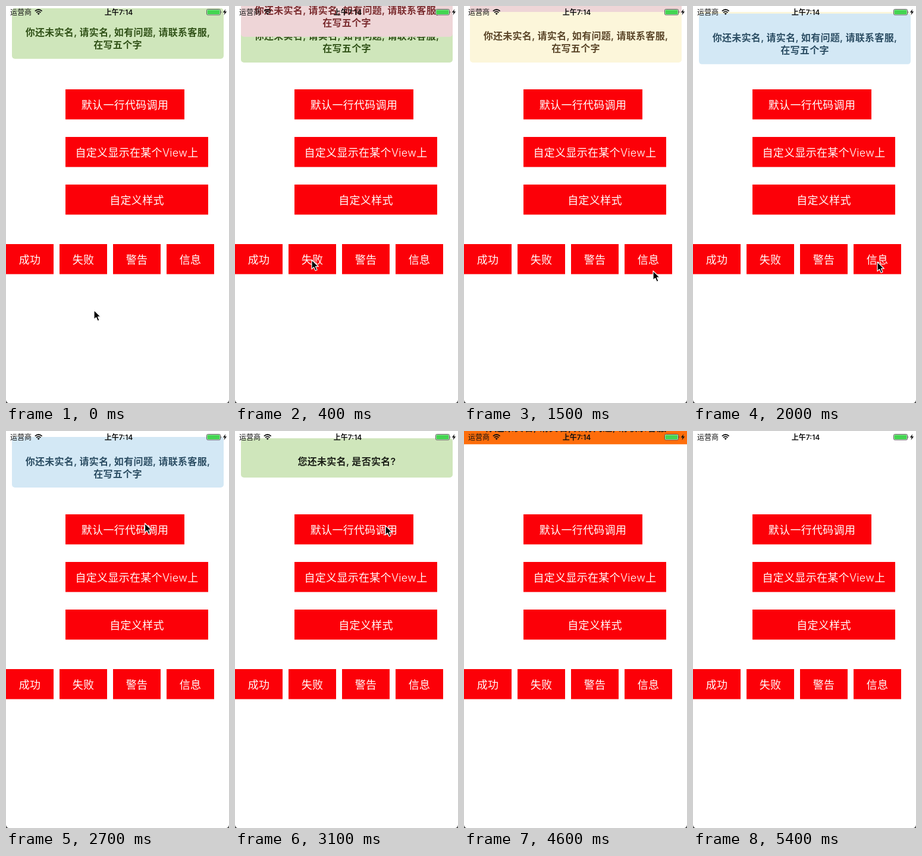
An HTML page that plays this animation: 375 px wide and 667 px high, repeating every 5500 ms.

```html
<!DOCTYPE html>
<html lang="zh-CN">
<head>
<meta charset="utf-8">
<title>Banner messages</title>
<style>
  html, body { margin: 0; width: 100%; height: 100%; overflow: hidden; background: #fff; }
  svg { display: block; width: 375px; height: 667px; }
  text { font-family: Inter, "Noto Sans CJK SC", "Noto Sans CJK", sans-serif; text-anchor: middle; }
  .label { font-size: 18px; font-weight: 300; letter-spacing: .3px; fill: #fff; }
  .message { font-size: 16px; font-weight: 600; letter-spacing: .3px; }
  .status { font-size: 12px; fill: #111; }
</style>
</head>
<body>
<svg id="stage" viewBox="0 0 375 667">
  <rect width="375" height="667" fill="#fff"/>
  <g id="buttons"></g>
  <g id="banners"></g>
  <g id="statusBar">
    <text class="status" x="25" y="14.6">运营商</text>
    <g fill="none" stroke="#111" stroke-width="1.8">
      <path d="M48.8 8.6Q54.7 3.4 60.6 8.6"/>
      <path d="M51 11Q54.7 7.8 58.4 11"/>
    </g>
    <path d="M54.7 15L52.6 12.6Q54.7 11 56.8 12.6Z" fill="#111"/>
    <text class="status" x="189.5" y="14.6" font-weight="600">上午7:14</text>
    <rect x="337.5" y="5.5" width="23" height="9.5" rx="2" fill="#fff" stroke="#333" stroke-width=".8"/>
    <rect x="338.5" y="6.5" width="21" height="7.5" rx="1" fill="#43d551"/>
    <path d="M361.6 8.6Q363.4 10.2 361.6 11.9Z" fill="#333"/>
    <path d="M369.2 5.2L364.8 10.8H367.6L366.6 15.2L371.2 9.3H368.3Z" fill="#111"/>
  </g>
  <path d="M0 662Q.6 666 4 667H0ZM375 662Q374.4 666 371 667H375Z" fill="#444"/>
  <path id="cursor" d="M0 0V15.6L3.6 12.3L6.2 18.2L9 17L6.5 11.2H11.4Z"
        fill="#000" stroke="#fff" stroke-width="1.2" stroke-linejoin="round"/>
</svg>
<script>
const LOOP = 5500, STEP = 100, LEAVE = 300;
const $ = id => document.getElementById(id);

function add(parent, tag, attrs, content = '') {
  const el = document.createElementNS('http://www.w3.org/2000/svg', tag);
  for (const key in attrs) el.setAttribute(key, attrs[key]);
  el.textContent = content;
  return parent.appendChild(el);
}

const buttons = [
  [100, 140, 200, '默认一行代码调用'],
  [100, 220, 240, '自定义显示在某个View上'],
  [100, 300, 240, '自定义样式'],
  [0, 400, 80, '成功'],
  [90, 400, 80, '失败'],
  [180, 400, 80, '警告'],
  [270, 400, 80, '信息']
];
for (const [x, y, width, label] of buttons) {
  add($('buttons'), 'rect', { x, y, width, height: 50.5, fill: '#fc0008' });
  add($('buttons'), 'text', { x: x + width / 2, y: y + 32.5, class: 'label' }, label);
}

const notice = '你还未实名, 请实名, 如有问题, 请联系客服';
const twoLines = [[notice + ',', 46.5], ['在写五个字', 67.5]];
const card = { x: 10, width: 356, rx: 5, rest: 10 };
const tall = { ...card, height: 85, lines: twoLines };
const banners = [
  { ...tall, start: -190, end: 860, fill: '#cfe6bb', ink: '#315218' },
  { ...tall, start: 300, end: 1350, fill: '#eed5d7', ink: '#7b2d30' },
  { ...tall, start: 950, end: 2000, fill: '#fcf6da', ink: '#5a4528' },
  { ...tall, start: 1700, end: 2750, fill: '#d3e8f5', ink: '#2b4d63' },
  { ...card, height: 66, lines: [['您还未实名, 是否实名?', 45]],
    start: 2800, end: 3950, fill: '#cfe6bb', ink: '#1c2018' },
  { x: 0, width: 375, rx: 0, rest: 0, height: 73, lines: [[notice, 51]], flat: true,
    start: 3600, end: 4350, fill: '#fe6d0b', ink: '#24201c' }
];
for (const b of banners) {
  b.el = add($('banners'), 'g', {});
  const { x, width, height, rx, fill } = b;
  add(b.el, 'rect', { x, width, height, rx, fill });
  for (const [line, y] of b.lines)
    add(b.el, 'text', { x: 188, y, class: 'message', fill: b.ink }, line);
}

// Time, x and y of the pointer tip.
const path = [
  [0, 148, 511], [300, 128, 425], [500, 130, 428], [800, 219, 410],
  [1000, 222, 420], [1200, 290, 455], [1300, 312, 455], [1500, 318, 445],
  [1700, 312, 428], [2000, 310, 430], [2400, 250, 190], [2500, 250, 190],
  [2700, 233.5, 155], [2900, 242, 158], [3100, 253, 159], [3200, 250, 185],
  [3500, 236, 322], [3700, 232, 330], [3800, 215, 597], [3900, 200, 760]
];

function pointerAt(t) {
  const i = path.findIndex(p => p[0] > t);
  if (i < 0) return path[path.length - 1].slice(1);
  const [a, b] = [path[i - 1], path[i]];
  const k = (t - a[0]) / (b[0] - a[0]);
  return [1, 2].map(n => a[n] + (b[n] - a[n]) * k);
}

// Damped spring from 0 to 1 with a slight overshoot.
function spring(ms) {
  const s = ms / 1000, decay = 11.7, freq = 10.5;
  return 1 - Math.exp(-decay * s) * (Math.cos(freq * s) + decay / freq * Math.sin(freq * s));
}

function bannerY(b, t) {
  let shown = spring(t - b.start);
  if (b.flat) shown = Math.min(shown, 1);
  const left = Math.min(Math.max((t - b.end) / LEAVE, 0), 1);
  return b.rest - (b.rest + b.height) * (1 - shown + left * left);
}

function draw(t) {
  for (const b of banners) {
    const visible = t >= b.start && t < b.end + LEAVE;
    b.el.setAttribute('display', visible ? 'inline' : 'none');
    if (visible) b.el.setAttribute('transform', `translate(0 ${bannerY(b, t).toFixed(2)})`);
  }
  $('cursor').setAttribute('transform', `translate(${pointerAt(t)})`);
}

const origin = performance.now();
function tick() {
  const t = (performance.now() - origin) % LOOP;
  draw(Math.floor(t / STEP) * STEP);
  requestAnimationFrame(tick);
}
tick();
</script>
</body>
</html>
```
